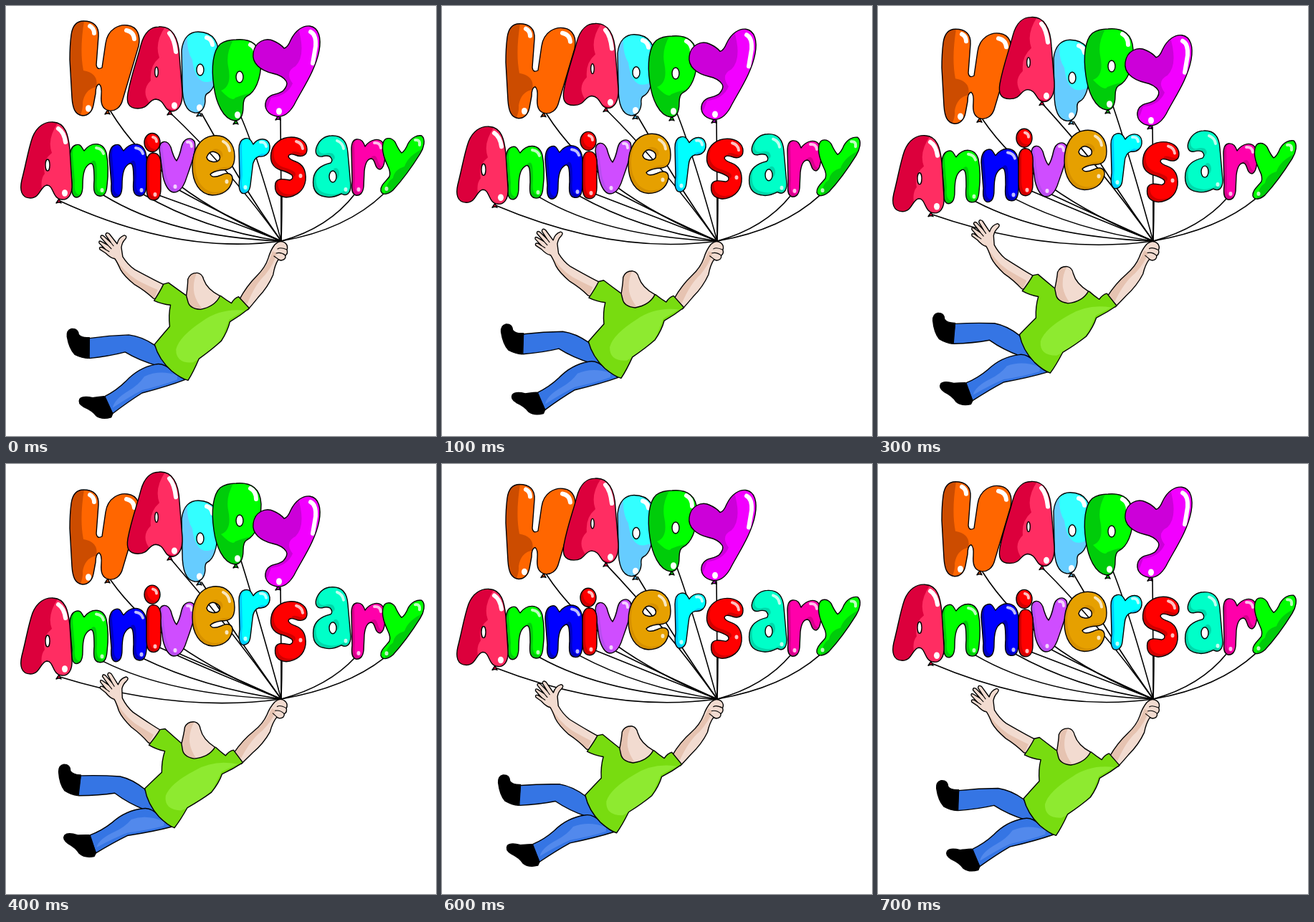
An HTML page with a canvas that plays this animation: 600 by 600 pixels, repeating every 0.8 s.

```html
<!DOCTYPE html>
<html lang="en">
<head>
<meta charset="utf-8">
<title>Happy Anniversary</title>
<style>
html, body { margin: 0; height: 100%; overflow: hidden; background: #fff }
canvas { display: block; width: 100vw; height: 100vh }
</style>
</head>
<body>
<canvas id="stage" width="600" height="600"></canvas>
<script>
const c = document.getElementById('stage').getContext('2d');
const P = d => new Path2D(d);
const oval = (x, y, rx, ry) =>
  `M${x - rx} ${y}a${rx} ${ry} 0 1 0 ${2 * rx} 0a${rx} ${ry} 0 1 0 ${-2 * rx} 0Z`;

const nShape = 'M97 194C105 191 106 199 109 202C118 190 135 188 140 205Q144 225 141 250C140 264 135 266 130 265C122 264 122 255 123 243C123 225 122 218 117 220C110 224 107 232 107 250C107 262 104 267 98 267C92 266 91 258 92 248L89 212Q89 197 97 194Z';

// drift per step, dark, light, outline, shine, spot; optional lit area, knot (large balloons), x shift
const letters = {
  H: { v: 3.75, dark: '#cc4c00', light: '#ff6600',
    d: 'M108 21C122 21 130 28 129 42L126 82Q127 90 134 86L139 52C142 32 158 25 170 27C184 29 188 42 185 56L163 130C160 143 151 147 144 146C134 144 132 136 133 124Q134 112 130 109Q125 110 125 122L122 138C120 149 113 153 107 153C96 152 93 142 92 128L89 75Q89 55 91 40C93 26 99 21 108 21Z',
    lit: 'M110 15Q102 60 108 90Q130 94 126 113Q110 116 107 135Q108 146 100 160H200V15Z',
    shine: 'M168 34Q178 36 179 46M117 28Q123 31 123 38', spot: [115, 143], knot: [142, 145] },
  p1: { v: 3.75, dark: '#66ccff', light: '#33ffff',
    d: 'M268 36C290 36 299 52 296 75C295 100 290 118 281 122Q277 124 278 133C277 145 270 150 263 149C250 147 246 132 246 110L245 62C247 43 257 36 268 36Z' + oval(271, 89, 5, 8),
    lit: 'M254 30Q250 60 260 75Q264 108 282 106L305 100V30Z',
    shine: 'M280 44Q287 46 288 54', spot: [270, 142], knot: [270, 148] },
  A: { v: -4.45, dark: '#dc003c', light: '#ff2d62',
    d: 'M213 29C232 27 241 45 242 70L246 120C247 138 240 147 231 147C220 146 222 131 209 130C198 131 200 143 184 143C170 143 168 134 170 122C175 95 183 75 188 55C193 36 203 29 213 29Z' + oval(210, 92, 2.3, 7),
    lit: 'M225 25Q206 50 214 72Q200 84 202 104Q188 118 200 135L255 152V25Z',
    shine: 'M228 38Q235 46 237 64', spot: [235, 139], knot: [229, 146] },
  p2: { v: -5, dark: '#00cc0a', light: '#00ff00',
    d: 'M321 47C343 45 355 55 356 76C356 103 347 121 336 126Q331 129 331 140C331 154 326 160 319 160C303 158 293 135 290 112C286 85 289 62 299 53C306 48 313 47 321 47Z' + oval(326, 99, 5, 8),
    lit: 'M322 40Q306 62 310 84Q316 112 300 118Q316 135 320 128Q340 120 360 118L365 40Z',
    shine: 'M341 54Q349 58 349 69', spot: [323, 152], knot: [321, 159] },
  Y: { v: 4.25, dark: '#cc00d9', light: '#f200ff',
    d: 'M345 66C347 50 362 43 374 49Q383 53 388 59Q393 58 397 48C404 33 415 27 424 28C437 30 440 45 437 62C432 90 412 118 402 138C395 150 386 155 378 154C366 152 359 143 363 132C368 121 379 125 387 118Q394 110 391 105Q386 97 372 94C355 90 343 80 345 66Z',
    lit: 'M406 25Q420 68 404 84Q388 92 400 108Q393 125 370 128L358 160H405L445 60V25Z',
    shine: 'M425 36Q433 40 432 56L428 80', spot: [381, 147], knot: [380, 153] },
  n1: { v: 2.9, dark: '#00cc0a', light: '#00ff00', d: nShape, shine: 'M126 198Q134 199 136 206', spot: [134, 257] },
  n2: { v: 2.2, dark: '#0000c0', light: '#0000ff', d: nShape, dx: 55, shine: 'M126 198Q134 199 136 206', spot: [134, 257] },
  v: { v: 2, dark: '#b94df0', light: '#cf4dff',
    d: 'M214 200C214 187 225 186 230 197Q234 212 238 216Q242 210 245 196C248 184 258 182 263 189C267 200 258 222 250 245C245 257 240 260 234 260C226 259 222 250 219 238Z',
    shine: 'M253 190Q259 189 259 196', spot: [236, 252] },
  i: { v: -2.1, dark: '#d00000', light: '#ff0000',
    d: 'M205 205C214 205 217 213 216 227V255C216 267 211 271 206 271C198 271 196 264 196 252V222Q196 206 205 205Z' + oval(204, 190.5, 11, 13),
    shine: 'M205 183Q210 184 210 189', spot: [208, 263] },
  A2: { v: 6.25, dark: '#dc003c', light: '#ff2d62',
    d: 'M66 162C83 163 87 180 89 200L92 248C93 264 86 271 78 270C64 269 67 250 57 250C48 251 48 268 34 268C21 268 19 256 22 243C28 220 31 200 37 183C43 168 54 161 66 162Z' + oval(58, 222, 3, 8),
    lit: 'M76 158Q56 184 64 205Q50 216 54 234Q44 246 56 275H100V158Z',
    shine: 'M73 171Q81 176 83 190', spot: [82, 261], knot: [74, 269] },
  e: { v: -2.5, dark: '#d69000', light: '#e6a000',
    d: 'M289 181C308 179 319 192 319 210C319 226 312 229 300 229Q288 231 285 235Q288 241 300 236C310 231 317 234 316 243C313 257 302 264 288 264C270 263 260 246 260 224C260 200 271 183 289 181ZM280 211Q284 201 292 204Q300 207 298 214Q294 219 287 217Q281 216 280 211Z',
    shine: 'M303 189Q311 193 312 202', spot: [308, 245] },
  r1: { v: -2.3, dark: '#00ccff', light: '#00ffff',
    d: 'M333 185C341 183 343 190 345 193C352 183 366 183 368 195C369 206 361 211 353 210Q345 212 344 225L341 250C340 260 334 263 329 261C324 257 325 248 326 240L325 200Q325 187 333 185Z',
    shine: 'M355 190Q362 189 363 196', spot: [334, 253] },
  s: { v: 2.2, dark: '#d00000', light: '#ff0000',
    d: 'M398 183C411 183 420 190 420 200C420 210 411 211 404 208Q395 205 394 210Q395 214 404 217C415 221 419 230 418 243C416 258 405 266 391 267C378 266 374 258 376 247C379 239 389 242 396 243Q402 241 399 236Q394 232 383 229C372 225 368 216 370 205C372 192 384 183 398 183Z',
    shine: 'M405 189Q413 191 414 199', spot: [411, 237] },
  a: { v: -2.3, dark: '#00d8aa', light: '#00ffc8',
    d: 'M454 181C470 180 476 190 477 205L481 250C481 262 475 266 468 262C460 266 452 268 445 266C432 264 427 255 429 240C431 228 440 222 453 219Q457 215 452 210Q447 208 441 210C433 211 430 204 434 195C438 186 446 181 454 181Z' + oval(456, 238, 5, 8),
    shine: 'M462 188Q470 191 471 199', spot: [474, 256] },
  r2: { v: 2, dark: '#d8008c', light: '#ff00aa',
    d: 'M489 186C497 185 499 191 501 196C508 186 522 182 527 193C531 204 529 226 522 228C514 228 516 214 510 213Q502 213 500 230L499 252C498 262 493 265 488 264C482 262 482 254 483 245L482 200Q482 187 489 186Z',
    shine: 'M514 191Q522 190 523 198', spot: [492, 256] },
  y: { v: 2.3, dark: '#00cc0a', light: '#00ff00',
    d: 'M526 192C528 182 538 183 543 190Q548 201 552 205Q557 202 561 192C566 183 574 180 580 181C586 186 583 198 578 206C568 222 552 244 540 257C532 264 525 264 523 258C522 250 531 244 535 238Q537 232 533 224C528 213 524 203 526 192Z',
    lit: 'M515 175H590V196Q562 206 556 224Q542 228 540 240Q530 246 528 265H515Z',
    shine: 'M571 187Q578 186 577 194', spot: [531, 255] }
};
for (const l of Object.values(letters)) {
  l.path = P(l.d);
  l.lit = l.lit && P(l.lit);
  l.shine = P(l.shine);
}

// letter, start point, control point; all meet in the fist
const strings = [
  ['H', 146, 147, 215, 260], ['A', 228, 148, 310, 225], ['p1', 273, 150, 325, 245],
  ['p2', 328, 155, 350, 205], ['Y', 383, 155, 384, 240], ['A2', 75, 272, 240, 348],
  ['n1', 136, 264, 230, 322], ['n2', 190, 262, 275, 312], ['i', 213, 264, 300, 295],
  ['v', 240, 256, 300, 290], ['s', 385, 265, 385, 300],
  ['r2', 487, 262, 450, 310], ['y', 527, 262, 475, 312]
];

const skin = '#f2dbd0', skinShade = '#e6c3b1', blue = '#3575e4', blueLight = '#5289ec';
// fill, outline, then an optional patch colour and shape
const man = [
  [skin, 'M206 409Q194 398 180 390Q165 378 160 369Q155 358 152 354Q146 353 139 346L131 341Q129 337 134 338L139 341L130 332Q129 328 133 330L142 335L132 324Q132 320 136 322L146 331L139 321Q139 316 144 319L155 333Q157 324 165 321Q170 322 166 327Q162 331 161 338Q162 345 163 351Q170 362 180 369Q195 377 207 383Q219 389 222 390L212 410Z',
    skinShade, 'M150 350Q164 372 184 384Q200 392 212 397L205 415L150 370Z'],
  [skin, 'M326 410Q336 391 350 377Q362 365 366 352Q369 341 375 333Q383 325 390 331Q394 335 392 340Q394 345 390 348Q391 354 384 355L380 354Q375 362 373 375Q366 392 352 407Q344 417 338 424Z',
    skinShade, 'M326 412Q335 388 352 376Q366 362 372 342L378 345Q374 360 362 375Q348 388 337 416Z'],
  [blue, 'M208 474Q190 462 172 460Q145 461 117 465V493Q145 490 167 484Q187 496 213 503L232 508Z'],
  [blue, 'M209 501Q185 506 168 525Q155 538 139 546L150 570Q172 553 191 541Q228 531 251 522L232 509Q220 498 209 501Z',
    blueLight, 'M240 516Q215 508 194 518Q186 530 172 538Q152 550 150 562Q175 545 191 537Q220 530 240 522Z'],
  ['#000', 'M117 464Q106 465 102 460Q101 451 92 452Q85 454 86 463Q89 480 97 488Q107 493 116 493Z'],
  ['#000', 'M138 546Q128 547 122 548Q108 545 104 550Q101 556 110 561Q122 566 127 573Q135 579 148 575L150 570Z'],
  ['#78dc10', 'M227 387Q238 395 251 404L300 405Q308 411 315 415Q319 408 325 406L340 422Q328 432 313 441Q310 454 301 468Q288 480 270 493Q262 512 255 523Q246 521 232 510Q214 494 208 473Q222 456 229 448Q227 432 230 418Q218 417 207 412Q216 398 220 389Z',
    '#8eea30', 'M333 425Q300 422 275 440Q242 462 238 480Q238 500 262 498Q290 482 303 462Q308 448 312 438Z'],
  [skin, 'M252 405Q254 390 254 382Q257 373 267 373Q274 374 276 382Q281 396 299 405Q292 420 272 424Q256 423 254 412Z',
    skinShade, 'M250 370H268Q260 385 263 402Q266 414 276 425H250Z']
].map(([fill, d, tone, patch]) => [fill, P(d), tone, patch && P(patch)]);
const folds = P('M379 339Q383 336 392 340M377 345Q384 343 390 348M374 349L381 354M146 331L150 336M142 335L147 340M139 341L144 344');

function line(path, color = '#000', width = 1.4) {
  c.strokeStyle = color;
  c.lineWidth = width;
  c.stroke(path);
}

function fill(path, color) {
  c.fillStyle = color;
  c.fill(path, 'evenodd');
}

function drawLetter(l, k) {
  const gloss = l.knot ? '#fff' : 'rgba(255,255,255,.75)';
  c.save();
  c.translate(l.dx || 0, l.v * k);
  if (l.knot) {
    const knot = P(`M${l.knot}l-4 6q4 -2 7 0Z`);
    fill(knot, l.dark);
    line(knot);
  }
  fill(l.path, l.dark);
  c.save();
  c.clip(l.path, 'evenodd');
  if (l.lit) {
    fill(l.lit, l.light);
  } else {
    c.translate(4, -4);
    fill(l.path, l.light);
    c.translate(-4, 4);
  }
  line(l.shine, gloss, l.knot ? 6 : 4);
  const [x, y] = l.spot, r = l.knot ? 4 : 2.5;
  fill(P(oval(x, y, r, r * 1.2)), gloss);
  c.restore();
  line(l.path);
  c.restore();
}

function drawMan(angle) {
  c.save();
  c.translate(384, 333);
  c.rotate(angle * Math.PI / 180);
  c.translate(-384, -333);
  for (const [color, path, tone, patch] of man) {
    fill(path, color);
    if (patch) {
      c.save();
      c.clip(path);
      fill(patch, tone);
      c.restore();
    }
    line(path);
  }
  line(folds, '#000', 1.1);
  c.restore();
}

function draw() {
  const step = Math.floor(performance.now() / 100) % 8;
  const k = 4 - Math.abs(4 - step);
  c.fillStyle = '#fff';
  c.fillRect(0, 0, 600, 600);
  c.lineCap = c.lineJoin = 'round';
  for (const [name, x, y, cx, cy] of strings)
    line(P(`M${x} ${y + letters[name].v * k}Q${cx} ${cy} 384 328`), '#000', 1.6);
  for (const l of Object.values(letters)) drawLetter(l, k);
  // the swing up lags a little, the swing back too
  const lag = k % 4 ? (step < 4 ? -.25 : .2) : 0;
  drawMan(.3 + 1.5 * k + lag);
  requestAnimationFrame(draw);
}
draw();
</script>
</body>
</html>
```
